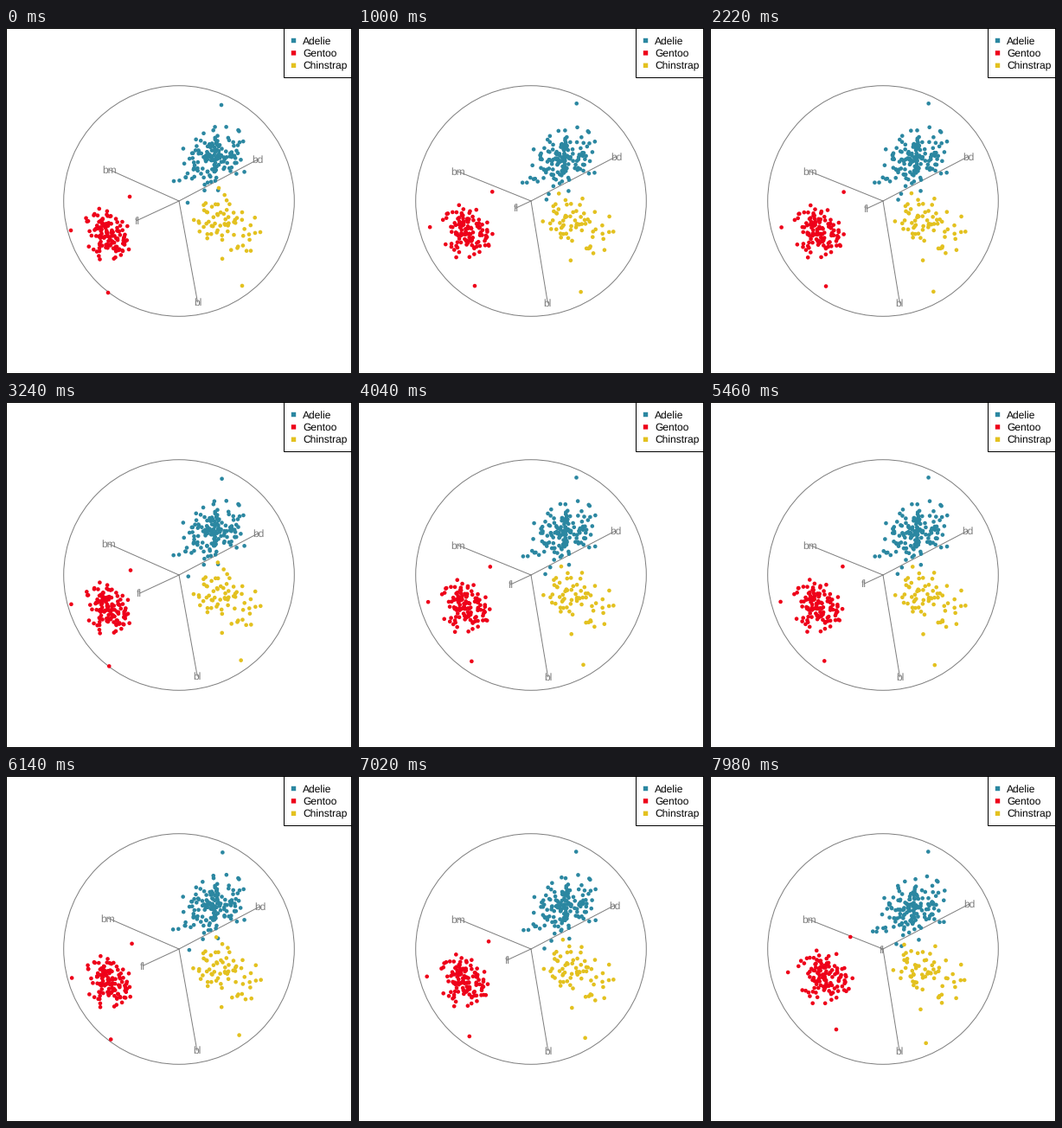
A matplotlib script for the animation above (8000 ms loop, 400x400 px).

```python
import numpy as np
import matplotlib.pyplot as plt
from matplotlib.animation import FuncAnimation
from matplotlib.patches import Circle, Rectangle

SIZE, DPI = 400, 100
PX = 72 / DPI                        # one pixel in points
MID, RADIUS = 200, 133.3
TICK, LOOP = 20, 8000
HALF = 34                            # steps from full "fl" weight to none
GREY = "#7f7f7f"

plt.rcParams.update({"font.family": "Liberation Sans",
                     "font.size": 12 * PX,
                     "text.hinting": "none",
                     "text.kerning_factor": 0})

# The view turns in one direction only: u changes, n stays fixed.
u = np.array([0.907, -0.421])
n = np.array([0.421, 0.907])
TOP = 0.4126
S0, C0 = np.sin(TOP), np.cos(TOP)


def split(xy):
    """Coordinates along u and n, seen from the centre."""
    rel = np.asarray(xy, float) - MID
    return rel @ u, rel @ n


def turn(flat, perp, fl, angle):
    """Project onto the stage after turning fl into view."""
    v = np.cos(angle) * flat - np.sin(angle) * fl
    return MID + np.outer(v, u) + np.outer(perp, n)


def make_cloud(rng, count, centre, spread, corr, fl_mean, far):
    """A correlated normal cloud whose last points are the far ones."""
    z = rng.normal(size=(3 * count, 2))
    z = z[np.hypot(*z.T) < 2.3][:count - len(far)]
    z[:, 1] = corr * z[:, 0] + np.sqrt(1 - corr ** 2) * z[:, 1]
    v, perp = split(centre + z * spread)
    fl = fl_mean - 0.15 * (v - v.mean()) + rng.normal(0, 13, len(v))

    # far points: x, y and shift along u between the two extreme views
    x, y, shift = np.array(far, float).T
    far_v, far_perp = split(np.c_[x, y])
    far_fl = (C0 * (far_v - shift) - far_v) / S0

    v, perp, fl = np.r_[v, far_v], np.r_[perp, far_perp], np.r_[fl, far_fl]
    return np.array([(v + S0 * fl) / C0, perp, fl])


def box(x, y, w, h, **style):
    # unsnapped, so half-pixel edges give crisp lines
    ax.add_patch(Rectangle((x, y), w, h, snap=False, **style))


fig = plt.figure(figsize=(SIZE / DPI, SIZE / DPI), dpi=DPI, facecolor="white")
ax = fig.add_axes([0, 0, 1, 1])
ax.set(xlim=(0, SIZE), ylim=(SIZE, 0))
ax.axis("off")

ax.add_patch(Circle((MID, MID), RADIUS, fill=False, ec=GREY, lw=PX))

# Axis tips in the view without fl
NAMES = ["bl", "bd", "fl", "bm"]
tips = (*split([(219, 318), (299.7, 148), (MID, MID), (114.5, 166)]),
        np.array([0, 0, RADIUS, 0]))
arms = [ax.plot([], [], color=GREY, lw=PX, zorder=2)[0] for _ in NAMES]
tags = [ax.text(0, 0, s, color=GREY, ha="center", va="baseline", zorder=2)
        for s in NAMES]

rng = np.random.default_rng(7)
SPECIES = {
    "Adelie": ("#2b87a1", make_cloud(
        rng, 151, (242, 151), (19.5, 17.5), -0.3, -29,
        [(249, 89, -3.5), (194, 177, 6.5), (210, 202, -13)])),
    "Gentoo": ("#ee0019", make_cloud(
        rng, 123, (118, 239), (14, 14.5), 0.1, 57,
        [(118, 306, -32), (143, 195, -22), (75, 234, -17.5)])),
    "Chinstrap": ("#e3c11f", make_cloud(
        rng, 68, (251, 229), (17.5, 17.5), 0.15, -16,
        [(273, 298, 26.5), (246, 185, 24.5), (294, 236, 0)])),
}
cloud = np.hstack([data for _, data in SPECIES.values()])
colors = [c for c, data in SPECIES.values() for _ in data[0]]
dots = ax.scatter(*cloud[:2], s=(4.6 * PX) ** 2, c=colors, linewidths=0,
                  zorder=3)

# Legend and frame
box(321.5, 0.5, 78, 57, fc="white", ec="black", lw=PX, zorder=4)
for row, (name, (color, _)) in enumerate(SPECIES.items()):
    y = 14.5 + 14.4 * row
    box(329.8, y - 2.7, 5.4, 5.4, fc=color, lw=0, zorder=5)
    ax.text(343, y + 4.4, name, color="black", va="baseline", zorder=5)
box(0.5, 0.5, SIZE - 1, SIZE - 1, fill=False, ec="black", lw=PX, zorder=6)


def step_at(tick):
    """Three steps every 140 ms, held for 20, 100 and 20 ms."""
    k, r = divmod(tick, 7)
    return 3 * k + (r >= 1) + (r >= 6)


def update(tick):
    phase = step_at(tick) % (2 * HALF)
    angle = TOP * abs(HALF - phase) / HALF
    for arm, tag, (x, y) in zip(arms, tags, turn(*tips, angle)):
        arm.set_data([MID, x], [MID, y])
        tag.set_position((x, y + 4.2))
    dots.set_offsets(turn(*cloud, angle))
    return [*arms, *tags, dots]


anim = FuncAnimation(fig, update, frames=LOOP // TICK, interval=TICK,
                     repeat=True, repeat_delay=0, blit=False)
plt.show()
```
